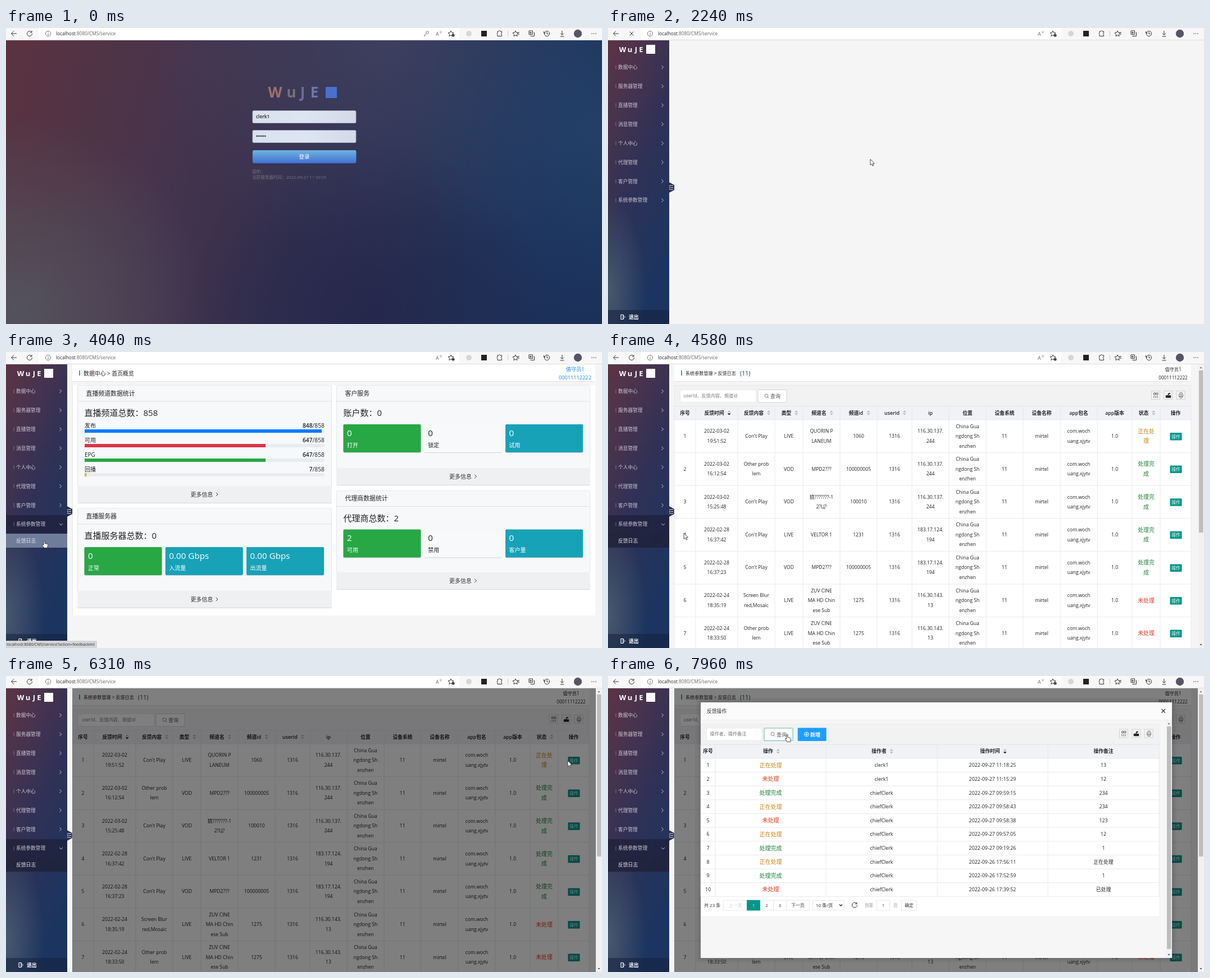
These frames come from a looping animation (1061x528 px, 8 s). An HTML page:

```html
<!DOCTYPE html>
<html lang="zh">
<head>
<meta charset="utf-8">
<style>
html, body { margin: 0; width: 100%; height: 100%; overflow: hidden; background: #f5f5f5; }
svg { display: block; width: 100%; height: 100%; font-family: "Open Sans", "Noto Sans CJK SC", "Noto Sans", sans-serif; }
text { white-space: pre; }
</style>
</head>
<body>
<svg id="stage" viewBox="0 0 1061 528"></svg>
<script>
// Drawing helpers: each returns SVG markup; text y is the vertical centre
const text = (x, y, s, size, fill = '#222', extra = '') =>
  `<text x="${x}" y="${y + size * .36}" font-size="${size}" fill="${fill}" ${extra}>${s}</text>`;
const MID = 'text-anchor="middle"', END = 'text-anchor="end"', BOLD = 'font-weight="600"';
const mid = (x, y, s, size, fill, extra = '') => text(x, y, s, size, fill, MID + ' ' + extra);
const rect = (x, y, w, h, fill, extra = '') =>
  `<rect x="${x}" y="${y}" width="${w}" height="${h}" fill="${fill}" ${extra}/>`;
const framed = (x, y, w, h, stroke = '#ddd', fill = '#fff', extra = '') =>
  rect(x + .5, y + .5, w - 1, h - 1, fill, `stroke="${stroke}" stroke-width=".8" ${extra}`);
const path = (d, stroke = '#333', width = 1, fill = 'none') =>
  `<path d="${d}" stroke="${stroke}" stroke-width="${width}" fill="${fill}" stroke-linejoin="round"/>`;
const circle = (x, y, r, fill, stroke = 'none') =>
  `<circle cx="${x}" cy="${y}" r="${r}" fill="${fill}" stroke="${stroke}"/>`;
const group = (id, body) => `<g id="${id}">${body}</g>`;
const each = (list, fn) => list.map(fn).join('');
const lines = (x, y, s, size, fill) => {
  const parts = s.split('/');
  return each(parts, (p, i) => mid(x, y + (i - (parts.length - 1) / 2) * 17.5, p, size, fill));
};
const stops = list => each(list, ([o, c, a = 1]) => `<stop offset="${o}" stop-color="${c}" stop-opacity="${a}"/>`);
const linear = (id, x2, y2, list) =>
  `<linearGradient id="${id}" x1="0" y1="0" x2="${x2}" y2="${y2}">${stops(list)}</linearGradient>`;
const glow = (id, x, y, r, color, a, squash = 1) =>
  `<radialGradient id="${id}" gradientUnits="userSpaceOnUse" cx="${x}" cy="${y}" r="${r}" gradientTransform="scale(${squash} 1)">` +
  `${stops([[0, color, a], [1, color, 0]])}</radialGradient>`;

const defs = '<defs>' +
  linear('wide', 1, .12, [[0, '#5b333f'], [.3, '#47344c'], [.55, '#34304e'], [.85, '#203158'], [1, '#1b3059']]) +
  linear('tall', .5, 1, [[0, '#5d3444'], [.3, '#45334f'], [.55, '#303156'], [1, '#1b3560']]) +
  linear('press', 0, 1, [[0, '#6fb3e2'], [1, '#426fd0']]) +
  linear('field', 1, 0, [[0, '#d9e1ef'], [.5, '#dee5f2'], [1, '#d2dae8']]) +
  glow('mist', 20, 500, 340, '#53545f', .95) + glow('sky', 680, 10, 420, '#454866', .65) +
  glow('sea', 1061, 180, 350, '#25456d', .75) + glow('night', 640, 528, 330, '#24254a', .8) +
  glow('haze', 0, 470, 170, '#4a5d72', .9, .4) + '</defs>';

const star = (x, y) => path(`M${x} ${y - 5}l1.5 3.2 3.5.5-2.5 2.4.6 3.5-3.1-1.7-3.1 1.7.6-3.5-2.5-2.4 3.5-.5z`);
const reload = (x, y, c = '#333') => path(`M${x + 3.5} ${y - 2.8}A4.5 4.5 0 1 0 ${x + 4.5} ${y}M${x + 4} ${y - 5}v3h-3`, c);
const chevron = (x, y, c) => path(`M${x - 1.7} ${y - 3.2}l3.2 3.2-3.2 3.2`, c);

const browser = rect(0, 0, 1061, 22, '#f7f7f8') + rect(58, 0, 749, 20, '#fff') + rect(0, 21, 1061, 1, '#dedee0') +
  path('M19 10H10M14 5.500L9.500 10 14 14.500') +
  group('reload', reload(42, 10)) + group('stop', path('M38.500 6.500l7 7M45.500 6.500l-7 7')) +
  circle(75, 10, 4.6, 'none', '#777') + rect(74.5, 9, 1, 4, '#777') + rect(74.5, 7, 1, 1, '#777') +
  text(89, 10, 'localhost<tspan fill="#666">:8080/CMS/service</tspan>', 8.3, '#223') +
  group('key', circle(750, 8, 2.3, 'none', '#777') + path('M748 10l-4 4h2.500', '#777')) +
  text(765, 10.5, 'A', 9, '#666') + path('M772 6q2 1 1 4M774 5q2 2 1 4', '#777', .7) +
  star(792, 10) + circle(796, 13, 2.6, '#444') + circle(824, 10, 5, '#d6d6d6') + rect(846, 5, 10, 10, '#222') +
  path('M875 6h2q1.500-3 3 0h2.500v3q-3 1.500 0 3v2.500h-7.500v-3q-2-1.500 0-2.500z') + rect(893, 5, 1, 10, '#ccc') +
  star(907, 10) + path('M911 8h3M911 11h3') +
  path('M931 5h6.500v6.500H931zM934 13.500v1h6.500V8h-1M934 6.500v4M932 8.500h4') +
  circle(963, 10, 4.6, 'none', '#333') + path('M963 7v3.500h2.500M957.500 6v3h3') +
  path('M990 5v7M987 9.500l3 3 3-3M986.500 15h7') + circle(1018, 10, 7.2, '#555565') +
  each([1043, 1046.5, 1050], x => circle(x, 10, .8, '#333'));

const brand = (xs, y, size, colors) =>
  each([...'WuJE'], (c, i) => mid(xs[i], y, c, size, colors[i] || colors[0], 'font-weight="700"'));

const login = each(['url(#wide)', 'url(#mist)', 'url(#sky)', 'url(#sea)', 'url(#night)'], f => rect(0, 22, 1061, 506, f)) +
  brand([479, 508, 528, 549], 115, 26, ['#a0706b', '#77717f', '#6c6ca0', '#6978b2']) + rect(569, 105, 20, 20, '#4a70cf') +
  framed(438.5, 147, 185, 23, '#aab3c6', 'url(#field)', 'rx="2"') + framed(438.5, 182, 185, 23, '#aab3c6', 'url(#field)', 'rx="2"') +
  text(445, 158.5, 'clerk1', 8.3, '#222', BOLD) + text(445, 193.5, '••••••', 8, '#111', BOLD) +
  rect(439, 219, 184.5, 23.5, '#232a50', 'rx="3"') + rect(439, 218, 184.5, 23.5, 'url(#press)', 'rx="3"') +
  mid(531, 230, '登录', 9.6, '#fff') + text(438, 256.5, '说明：', 7.6, '#777284') +
  text(438, 266.5, '当前服务器时间：2022-09-27 11:30:0<tspan id="second">5</tspan>', 7.6, '#777284');

const menu = ['数据中心', '服务器管理', '直播管理', '消息管理', '个人中心', '代理管理', '客户管理', '系统参数管理'];
const sidebar = rect(0, 22, 1061, 506, '#f5f5f5') + rect(0, 22, 109, 506, 'url(#tall)') + rect(0, 22, 109, 506, 'url(#haze)') +
  brand([26, 39, 50, 59], 38.5, 13, ['#fff']) + rect(68, 30, 16, 16, '#fff') +
  group('opened', rect(0, 291, 109, 33, '#1c1e35', 'opacity=".65"') + rect(0, 324, 109, 25, '#1f2138', 'opacity=".8"') +
    group('subHover', rect(0, 324, 109, 25, '#6f7d9b')) + text(18, 337, '反馈日志', 8.8, '#e2e2ea') + path('M95 306l3 3 3-3', '#c9c5d0')) +
  each(menu, (m, i) => {
    const y = 70 + i * 33.9, arrow = chevron(97, y, '#c9c5d0');
    return each([-2.5, 0, 2.5], d => rect(13.5, y + d - .5, 1, 1, '#c9c5d0')) + text(18, y, m, 8.7, '#cbc7d2') +
      (i == 7 ? group('closed', arrow) : arrow);
  }) +
  rect(0, 503, 109, 25, '#14213f', 'opacity=".55"') + path('M23 511.500h4v8h-4zM27 513h2M27 518h2M27 515.500h4', '#fff', 1.2) +
  text(37, 516, '退出', 8.8, '#fff', BOLD) + path('M108.500 275l9.500 5v9l-9.500 5z', 'none', 0, '#282d50') +
  path('M109 281h7M112 284.500h4M109 288h7M109 283l2 1.500-2 1.500', '#fff', .9);

const heading = rect(118, 22, 931, 31, '#fff') + rect(118, 52, 931, 1, '#e4e4e4') + rect(130, 33, 2, 9, '#1e9fff');
const more = (x, y) => text(x - 25, y, '更多信息', 10, '#333') + chevron(x + 22, y, '#333');
const GREEN = '#28a745', TEAL = '#17a2b8', PALE = '#f8f9fa';
const card = (x, y, w, h, title, total, tiles = []) =>
  rect(x, y + 1, w, h, '#d4d6d9', 'rx="2"') + framed(x, y, w, h, '#e4e6e8', '#f7f8fa', 'rx="2"') + rect(x, y + 28.5, w, 1, '#dfe1e4') +
  text(x + 15.5, y + 15, title, 10.9) + text(x + 12.5, y + 50, total, 15) +
  rect(x, y + h - 30, w, 30, '#eff0f2') + more(x + w / 2, y + h - 15) +
  each(tiles, ([n, label, fill], i) => {
    const tx = x + 12.5 + i * 144.3, ty = y + 70, ink = fill == PALE ? '#222' : '#fff';
    return rect(tx, ty + 1, 138, 50, '#cfd2d5', 'rx="2"') + rect(tx, ty, 138, 50, fill, 'rx="2"') +
      text(tx + 6.5, ty + 15.5, n, 15.2, ink) + text(tx + 6.5, ty + 37, label, 10, ink);
  });
const bars = [['发布', 848, '#007bff'], ['可用', 647, '#dc3545'], ['EPG', 647, GREEN], ['回播', 7, '#e0ac38']];
const dashboard = heading + rect(118, 59, 931, 411, '#fff') + rect(118, 59, 1, 411, '#e8e8e8') +
  text(138, 38, '数据中心 &gt; 首页概览', 9.9) +
  mid(1013, 31, '值守员1', 9.3, '#1e88f0') + mid(1013, 46, '00011112222', 9.2, '#1e88f0') +
  card(127, 59, 453, 210, '直播频道数据统计', '直播频道总数：858') +
  each(bars, ([label, n, c], i) => {
    const y = 131 + i * 26;
    return text(140, y, label, 10) + text(567, y, `<tspan ${BOLD}>${n}</tspan>/858`, 10.3, '#222', END) +
      rect(140, y + 7, 427, 6, '#e9ecef') + rect(140, y + 7, 427 * n / 858, 6, c);
  }) +
  card(127, 278, 453, 178, '直播服务器', '直播服务器总数：0', [[0, '正常', GREEN], ['0.00 Gbps', '入流量', TEAL], ['0.00 Gbps', '出流量', TEAL]]) +
  card(588, 59, 452, 178, '客户服务', '账户数：0', [[0, '打开', GREEN], [0, '锁定', PALE], [0, '试用', TEAL]]) +
  card(588, 246.5, 452, 176.5, '代理商数据统计', '代理商总数：2', [[2, '可用', GREEN], [0, '禁用', PALE], [0, '客户量', TEAL]]);

const statusColor = s => ({ 正: '#c0861a', 处: '#1c8038', 未: '#e23a1e' })[s[0]];
const finder = (x, y, w, hint, id) => framed(x, y, w, 23, '#e6e6e6') + text(x + 6.5, y + 11, hint, 8.1, '#777') +
  framed(x + w + 2.5, y, 52, 23.5, '#c9c9c9', '#fff', `id="${id}" rx="1"`) + circle(x + w + 18, y + 11, 3, 'none', '#888') +
  path(`M${x + w + 20} ${y + 13}l2.500 2.500`, '#888') + text(x + w + 25, y + 12, '查询', 9, '#555');
const tools = (x, y) => each([0, 22.3, 44.5], d => framed(x + d, y, 16, 16, '#ccc', 'none')) +
  path(`M${x + 4.500} ${y + 4}h3v3h-3zM${x + 9} ${y + 4}h3v3h-3zM${x + 5} ${y + 9}v4M${x + 8} ${y + 9}v4M${x + 11} ${y + 9}v4`, '#555', .9) +
  path(`M${x + 26.500} ${y + 9}h8v3h-8zM${x + 30} ${y + 8}l1-3h3`, '#222', 1.4, '#222') +
  path(`M${x + 49.500} ${y + 6.500}h7v4h-7zM${x + 51} ${y + 6}v-2.500h4v2.500M${x + 51} ${y + 9}h4v4h-4z`, '#777', .9);
// A trailing * marks a sortable column, ! the active sort
const tableHead = (edges, y, labels) => rect(edges[0], y, edges.at(-1) - edges[0], 24.5, '#f1f2f6') +
  each(labels.split(' '), (label, i) => {
    const name = label.replace(/[*!]/, ''), sorted = name != label, x = (edges[i] + edges[i + 1]) / 2 - (sorted ? 4.5 : 0);
    const ax = x + name.replace(/[^\x00-\x7f]/g, '--').length * 2.2 + 9;
    return mid(x, y + 12, name, 8.8, '#222', BOLD) + (sorted ?
      path(`M${ax - 3} ${y + 11}l3-3 3 3z`, 'none', 0, '#b2b2b2') +
      path(`M${ax - 3} ${y + 13}l3 3 3-3z`, 'none', 0, label.endsWith('!') ? '#111' : '#b2b2b2') : '');
  });
const grid = (edges, y, count, pitch) => {
  const x0 = edges[0], x1 = edges.at(-1), bottom = y + 24.5 + count * pitch;
  const rules = Array.from({ length: count + 1 }, (_, i) => `M${x0} ${y + 24.5 + i * pitch}H${x1}`).join('');
  return path(`M${x0} ${y}H${x1}` + rules + edges.map(x => `M${x} ${y}V${bottom}`).join(''), '#e4e5e7', .8);
};
const scrollbar = (x, top, bottom, from, to) => rect(x, top, 10, bottom - top, '#f1f1f1') + rect(x + 1.5, from, 7.5, to - from, '#bdbdbd') +
  path(`M${x + 3} ${top + 7}l2-2.500 2 2.500z`, 'none', 0, '#666') + path(`M${x + 3} ${bottom - 7}l2 2.500 2-2.500z`, 'none', 0, '#444');

const edges = [118, 156, 231, 297, 347, 413, 479, 541, 607, 673, 739, 805, 871, 933, 983, 1038];
const reports = [
  '2022-03-02/19:51:52|Con\'t Play|LIVE|QUORIN P/LANEUM|1060|116.30.137./244|正在处/理',
  '2022-03-02/16:12:54|Other prob/lem|VOD|MPD2???|100000005|116.30.137./244|处理完/成',
  '2022-03-02/15:25:48|Con\'t Play|VOD|娆???????-1/2?Ц?|100010|116.30.137./244|处理完/成',
  '2022-02-28/16:37:42|Con\'t Play|LIVE|VELTOR 1|1231|183.17.124./194|处理完/成',
  '2022-02-28/16:37:23|Con\'t Play|VOD|MPD2???|100000005|183.17.124./194|处理完/成',
  '2022-02-24/18:35:19|Screen Blur/red,Mosaic|LIVE|ZUV CINE/MA HD Chin/ese Sub|1275|116.30.143./13|未处理',
  '2022-02-24/18:33:50|Other prob/lem|LIVE|ZUV CINE/MA HD Chin/ese Sub|1275|116.30.143./13|未处理'];
const feedback = heading + rect(1038, 22, 12, 506, '#f5f5f5') +
  text(138, 38, '系统参数管理 &gt; 反馈日志', 8.1) + text(235, 38, '(11)', 10.6, '#1d4a4a') +
  mid(1006, 31, '值守员1', 8.2) + mid(1006, 46, '00011112222', 8.2) +
  rect(118, 59, 920, 469, '#fff') + framed(118, 59, 920, 39, '#e6e6e6', '#f2f2f2') +
  finder(128, 67, 136, 'userId、反馈内容、频道id', 'find') + tools(967, 69) +
  tableHead(edges, 96.5, '序号 反馈时间! 反馈内容* 类型* 频道名* 频道id* userId* ip 位置 设备系统 设备名称 app包名 app版本 状态* 操作') +
  grid(edges, 96.5, 7, 58.6) +
  each(reports, (r, i) => {
    const [date, issue, kind, channel, id, ip, status] = r.split('|'), y = 150 + i * 58.6;
    const cells = [`${i + 1}`, date, issue, kind, channel, id, '1316', ip, 'China Gua/ngdong Sh/enzhen', '11', 'mirtel', 'com.woch/uang.xjytv', '1.0', status];
    return each(cells, (c, j) => lines((edges[j] + edges[j + 1]) / 2, y, c, j == 13 ? 9.9 : 8.6, j == 13 ? statusColor(c) : '#222')) +
      rect(1000.5, y - 6, 21, 13.5, '#009688', 'rx="1"') + mid(1011, y + .7, '操作', 7.8, '#fff');
  }) + scrollbar(1050.5, 22, 528, 33, 322);

const logEdges = [165, 191, 388, 586, 783, 981];
const logs = ['正在处理|27 11:18:25|13', '未处理|27 11:15:29|12', '处理完成|27 09:59:15|234', '正在处理|27 09:58:43|234', '未处理|27 09:58:38|123',
  '正在处理|27 09:57:05|12', '处理完成|27 09:19:26|1', '正在处理|26 17:56:11|正在处理', '处理完成|26 17:52:59|1', '未处理|26 17:39:52|已处理'];
const pager = (x, w, s, ink = '#333', fill = '#fff') => framed(x, 399.5, w, 19, fill == '#fff' ? '#e2e2e2' : fill, fill) + mid(x + w / 2, 409, s, 7.8, ink);
const modal = each([8, 5, 2], d => rect(165 - d, 47 - d, 839 + 2 * d, 456 + 2 * d, '#000', 'rx="4" opacity=".04"')) +
  rect(165, 47, 839, 456, '#f6f6f6', 'rx="1"') + rect(165, 47, 839, 31, '#fbfbfb') + rect(165, 78, 839, 1, '#eee') +
  text(176, 63, '反馈操作', 8.8, '#333') + path('M985.500 59l6.500 6.500M992 59l-6.500 6.500', '#333', 1.2) +
  rect(165, 122, 816, 306, '#fff') + framed(165, 85.5, 816, 37, '#e6e6e6', '#f2f2f2') +
  finder(175, 92.5, 100, '操作者、操作备注', 'findLog') +
  rect(337.7, 92.5, 51, 23.5, '#1e9fff', 'rx="1"') + circle(353.5, 104, 3.8, 'none', '#fff') + path('M351 104h5M353.500 101.500v5', '#fff') +
  text(360, 104.5, '新增', 9, '#fff', BOLD) + tools(910, 94.5) +
  tableHead(logEdges, 122.3, '序号 操作* 操作者* 操作时间! 操作备注') + grid(logEdges, 122.3, 10, 24.65) +
  each(logs, (row, i) => {
    const [status, time, note] = row.split('|');
    const cells = [i + 1, status, i < 2 ? 'clerk1' : 'chiefClerk', '2022-09-' + time, note];
    return each(cells, (c, j) => mid((logEdges[j] + logEdges[j + 1]) / 2, 159 + i * 24.65, c, j == 1 ? 10 : 8.9, j == 1 ? statusColor(c) : '#222'));
  }) +
  text(171, 409, '共 23 条', 8, '#333') + pager(205, 43, '上一页', '#c8c8c8') + pager(270, 25, '2') + pager(294, 24, '3') +
  pager(317, 42, '下一页') + pager(247, 24, '1', '#fff', '#009688') + framed(364, 400, 57, 18, '#e2e2e2') + text(370, 409, '10 条/页', 8) +
  path('M412 407.500l2.500 2.500 2.500-2.500', '#222', 1.3) + reload(439, 408.5) +
  text(457, 409, '到第', 7.6, '#999') + pager(478, 24, '1') + text(508, 409, '页', 7.6, '#999') + pager(522, 28, '确定') +
  scrollbar(993.5, 79, 503, 90, 487);

const pointer = circle(-.5, -.5, 8, '#cfc936', 'none').replace('/>', ' id="click" opacity=".85"/>') +
  group('arrow', path('M0 0V10.700l2.500-2.300 1.700 3.700 1.700-.8-1.700-3.500h3.300z', '#222', .8, '#fff')) +
  group('hand', path('M-1 0q1-1 2 0v4.500l4.500 1q1.500.5 1 2.500l-1 4.500h-5.500l-3.500-5q0-1.500 1.500-.8l1 .8z', '#222', .8, '#fff')) +
  group('beam', path('M-2.500-5h5M0-5V5M-2.500 5h5', '#ddd', 1.2));

document.getElementById('stage').innerHTML = defs + group('login', login) + group('sidebar', sidebar) +
  group('dashboard', dashboard) + group('feedback', feedback) + group('shade', rect(118, 22, 932, 506, '#000', 'opacity=".5"')) +
  group('modal', modal) + browser +
  group('link', rect(0, 515, 162, 13, '#d4d5d8', 'rx="1"') + text(1, 521.5, 'localhost:8080/CMS/service?action=feedbacklist', 7.05, '#333')) +
  group('pointer', pointer);

const LOOP = 8000;
// Bursts of updates: start, end, number of steps
const bursts = [[110, 870, 12], [940, 1630, 11], [1760, 1830, 2], [2030, 2770, 12], [2860, 3620, 12], [3690, 4440, 11],
  [4510, 5280, 12], [5350, 6100, 12], [6170, 6650, 8], [7060, 7820, 12], [7890, 7960, 2]];
const trail = [[110, 858, 482], [870, 652, 284], [1350, 448, 256], [1490, 456, 195], [1630, 467, 234], [2300, 467, 234], [2770, 102, 270],
  [3150, 76, 307], [3550, 68, 337], [4440, 68, 337], [5280, 970, 153], [5620, 990, 150], [5900, 1000, 151], [7060, 1000, 151],
  [7330, 780, 472], [7600, 450, 280], [7820, 319, 105], [8000, 319, 105]];

function snap(t) {
  const burst = bursts.findLast(b => b[0] <= t);
  if (!burst) return 0;
  const [start, end, count] = burst, step = (end - start) / (count - 1);
  return start + Math.min(count - 1, Math.floor((t - start + 5) / step)) * step;
}
function pointerAt(t) {
  const i = Math.max(1, trail.findIndex(k => k[0] > t));
  const [t0, x0, y0] = trail[i - 1], [t1, x1, y1] = trail[i];
  const p = Math.min(1, Math.max(0, (t - t0) / (t1 - t0))), e = p * p * (3 - 2 * p);
  return [x0 + (x1 - x0) * e, y0 + (y1 - y0) * e];
}
const el = id => document.getElementById(id);
const show = (id, on) => el(id).setAttribute('display', on ? 'inline' : 'none');

function draw(now) {
  const t = snap(now % LOOP), within = (a, b) => t >= a && t < b;
  show('login', t < 2030);
  show('key', t < 2030);
  show('sidebar', t >= 2030);
  show('dashboard', within(2440, 4230));
  show('feedback', t >= 4230);
  show('stop', within(2030, 2560));
  show('reload', !within(2030, 2560));
  show('opened', t >= 3270);
  show('closed', t < 3270);
  show('subHover', within(3470, 4500));
  show('link', within(3470, 4230));
  el('second').textContent = t < 590 ? 5 : t < 1755 ? 6 : 7;

  const p = Math.min(1, Math.max(0, (t - 6320) / 300)), left = (1 - p) ** 2.4;
  show('shade', t >= 6300);
  show('modal', p > 0);
  el('modal').setAttribute('transform', `translate(0 ${Math.round(1104 * left)})`);
  el('modal').setAttribute('opacity', 1 - left);
  el('findLog').setAttribute('stroke', t >= 7885 ? '#3fa59b' : '#c9c9c9');

  const beam = within(1300, 1520);
  const hand = within(1520, 1755) || within(2780, 4500) || within(5860, 6300) || t >= 7750;
  show('pointer', t >= 110);
  show('beam', beam);
  show('hand', hand);
  show('arrow', !beam && !hand);
  show('click', within(4000, 4150));
  el('pointer').setAttribute('transform', `translate(${pointerAt(t).map(v => Math.round(v))})`);
  requestAnimationFrame(() => draw(performance.now()));
}
draw(0);
</script>
</body>
</html>
```
